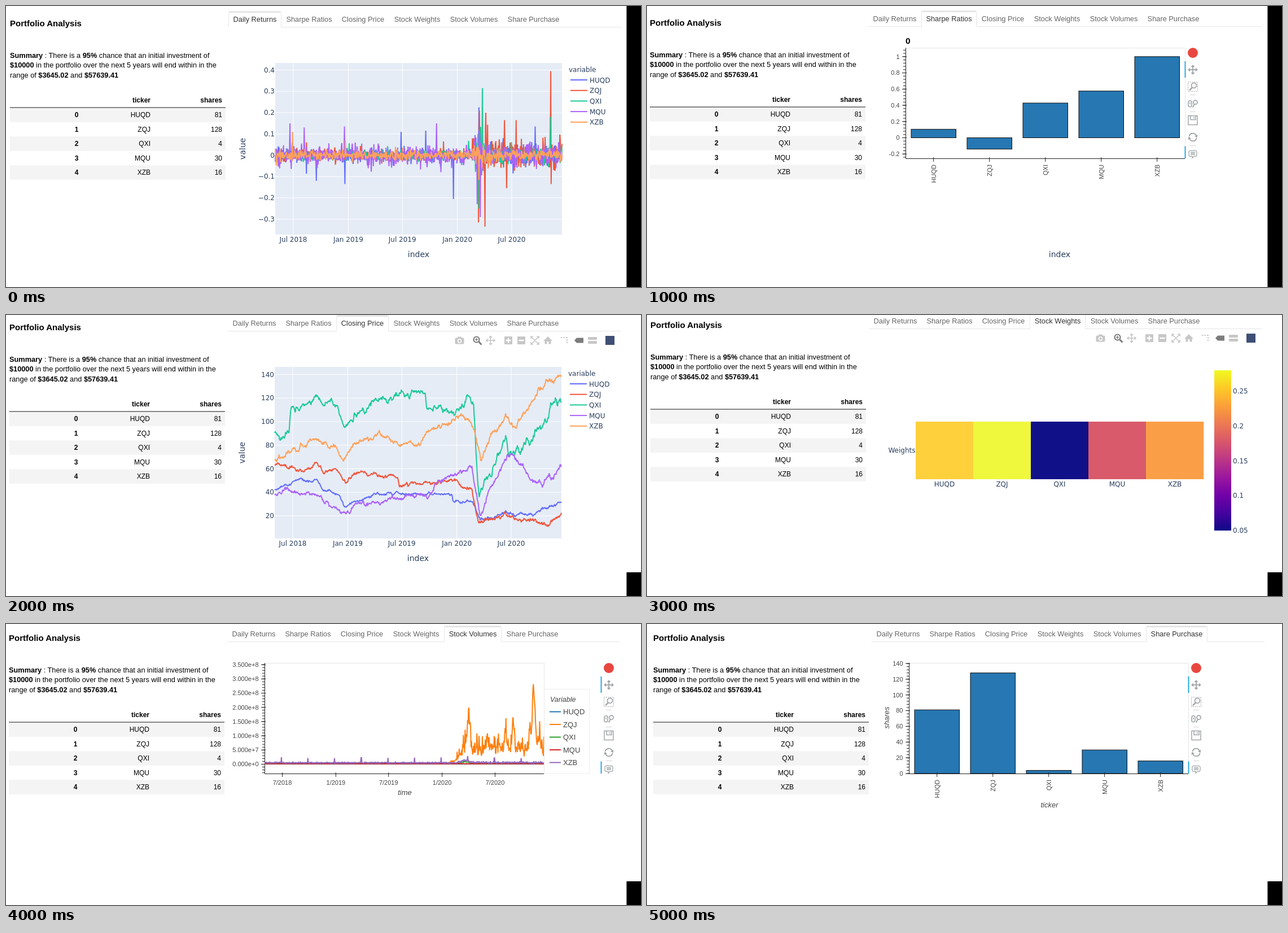
Animation of 1125x498 px, one loop 6 s. Source, as an HTML page:

```html
<!DOCTYPE html>
<html lang="en">
<head>
<meta charset="utf-8">
<title>Portfolio Analysis</title>
<style>
html, body { margin: 0; width: 100%; height: 100%; overflow: hidden; background: #fff; }
svg { display: block; width: 100vw; height: 100vh; font-family: "Liberation Sans", Arial, sans-serif; }
.b { font-weight: bold; }
.i { font-style: italic; fill: #444; font-size: 13px; }
.m { text-anchor: middle; }
.e { text-anchor: end; }
.v { font-family: "DejaVu Sans", Verdana, sans-serif; font-size: 12px; fill: #2a3f5f; }
.t { font-size: 11px; fill: #444; }
.tab { font-size: 12.8px; fill: #666; text-anchor: middle; }
.s { font-size: 12.75px; }
</style>
</head>
<body>
<svg id="stage" viewBox="0 0 1125 498"></svg>
<script>
const names = ['HUQD', 'ZQJ', 'QXI', 'MQU', 'XZB'];
const shares = [81, 128, 4, 30, 16];
const express = ['#636efa', '#ef553b', '#1cca98', '#ab63fa', '#ffa15a'];
const classic = ['#1f77b4', '#ff7f0e', '#2ca02c', '#d62728', '#9467bd'];

// Drawing helpers
const text = (x, y, s, cls = '', more = '') => `<text x="${x}" y="${y}" class="${cls}" ${more}>${s}</text>`;
const turned = (x, y, s, cls, more = '') => text(0, 0, s, cls, `transform="translate(${x} ${y}) rotate(-90)" ${more}`);
const rect = (x, y, w, h, fill, more = '') => `<rect x="${x}" y="${y}" width="${w}" height="${h}" fill="${fill}" ${more}/>`;
const path = (d, stroke, w = 1, more = '') => `<path d="${d}" fill="none" stroke="${stroke}" stroke-width="${w}" ${more}/>`;
const at = (x, y, s) => `<g transform="translate(${x} ${y})">${s}</g>`;
const each = (list, f) => list.map(f).join('');
const span = (n, step = 1, from = 0) => Array.from({ length: n }, (_, i) => from + i * step);

// Seeded noise
let seed = 11;
const rand = () => (seed = (seed * 16807) % 2147483647) / 2147483647;
const gauss = () => (rand() + rand() + rand() + rand() - 2) * 1.73;

// Time series: t runs over 32 months, one sample per trading day
const days = 664, months = 32;
const series = (f, toX, toY, color) => path('M' + span(days).map(k => {
  const t = k / (days - 1) * months;
  return toX(t).toFixed(1) + ' ' + toY(f(t)).toFixed(1);
}).join('L'), color, 2, 'stroke-miterlimit="2"');

const halfYears = span(5).map(i => new Date(Date.UTC(2018, 6 + 6 * i, 1)));
const daysIn = d => (d - halfYears[0]) / 864e5;

// Value at t on key points t0,v0,t1,v1,...
function lerp(k, t) {
  let i = 0;
  while (i < k.length - 4 && t > k[i + 2]) i += 2;
  return k[i + 1] + (k[i + 3] - k[i + 1]) * (t - k[i]) / (k[i + 2] - k[i]);
}

// Left column and tab bar
const tabs = ['Daily Returns', 'Sharpe Ratios', 'Closing Price', 'Stock Weights', 'Stock Volumes', 'Share Purchase'];
const edges = [394, 488, 586, 679, 778, 880, 989];

function page(active) {
  const l = edges[active] + .5, r = edges[active + 1] - .5;
  const b = s => `<tspan class="b">${s}</tspan>`;
  return text(7, 36, 'Portfolio Analysis', 'b', 'font-size="15"') +
    text(7, 91.5, b('Summary') + ' : There is a ' + b('95%') + ' chance that an initial investment of', 's') +
    text(7, 109, b('$10000') + ' in the portfolio over the next 5 years will end within in the', 's') +
    text(7, 126.5, 'range of ' + b('$3645.02') + ' and ' + b('$57639.41'), 's') +
    `<g font-size="12">` + text(256, 171, 'ticker', 'b e') + text(383, 171, 'shares', 'b e') +
    each(names, (n, i) => {
      const y = 197.3 + i * 25.5;
      return (i % 2 ? '' : rect(7, y - 17, 382, 25.5, '#f4f4f4')) +
        text(128.5, y, i, 'b e') + text(256, y, n, 'e') + text(383, y, shares[i], 'e');
    }) + '</g>' + path('M7 180H389', '#111') +
    path(`M394 37.5H${l}V12q0-2 2-2H${r - 2}q2 0 2 2V37.5H1090`, '#e6e6e6') +
    path(`M${l + 1} 10.5H${r - 1}`, '#e6e6e6', 3) +
    each(tabs, (s, i) => text((edges[i] + edges[i + 1]) / 2, 27.5, s, 'tab', i == active ? 'style="fill:#333"' : ''));
}

// Line chart on a tinted panel
const panelX = t => 477 + t * 508 / months;
const indexLabel = text(731, 444.5, 'index', 'v m', 'style="font-size:14px"');

function panel(ticks, toY, lines) {
  return rect(477, 101, 508, 304, '#e5ecf6') +
    each(halfYears, d => {
      const x = 509 + daysIn(d) * .5294;
      return path(`M${x} 101V405`, '#fff') +
        text(x, 417.5, `${d.getUTCMonth() ? 'Jul' : 'Jan'} ${d.getUTCFullYear()}`, 'v m');
    }) +
    each(ticks, v => path(`M477 ${toY(v)}H985`, '#fff', v ? 1 : 2) +
      text(476, toY(v) + 4, String(v).replace('-', '−'), 'v e')) +
    lines.join('') + indexLabel +
    turned(424, 253, 'value', 'v m', 'style="font-size:14px"') + text(997, 116.5, 'variable', 'v') +
    each(names, (n, i) => path(`M1000 ${131 + i * 18.7}h30`, express[i], 2) + text(1034, 135.5 + i * 18.7, n, 'v'));
}

// Daily returns: noise that swells in the crash, plus a few big days
function daily() {
  const toY = v => 264.5 - v * 377.5;
  const returns = (i, calm, after, crash, ...big) => series(t => {
    const day = big.find(b => Math.abs(b[0] - t) < months / days / 2);
    if (day) return day[1];
    const swell = t < 22 ? 1 : after + crash * Math.exp(-((t - 22.8) ** 2) * 3);
    return gauss() * calm * swell * (rand() < .03 ? 2.2 : 1);
  }, panelX, toY, express[i]);
  return panel(span(8).map(i => (4 - i) / 10), toY, [
    returns(0, .014, 1.9, 2, [4.6, -.12], [7.75, -.135], [14.05, .11], [16.8, .115], [19.9, -.205], [22.74, .225], [29, .135]),
    returns(1, .014, 2.5, 3, [22.7, -.315], [23.4, -.335], [23.5, .2], [25.6, .165], [25.8, -.155], [26.9, .165], [30.74, .395], [30.8, -.135]),
    returns(2, .012, 1.7, 4, [22.74, -.25], [23.1, .315], [30.7, .18]),
    returns(3, .023, 1.1, 2, [1.64, .15], [7.7, .135], [18, .15], [22.55, -.23], [22.9, -.29]),
    returns(4, .012, 1.15, 1.5, [1.95, .11], [7.8, .07], [22.74, -.115])
  ]);
}

// Closing prices: a noisy walk around a few turning points
function closing() {
  const toY = v => 365 - (v - 20) * 2.0875;
  const price = (i, rough, ...keys) => {
    let drift = 0;
    return series(t => {
      drift = .85 * drift + gauss() * rough * (t > 22 ? 1.3 : 1);
      return lerp(keys, t) + drift;
    }, panelX, toY, express[i]);
  };
  return panel(span(7).map(i => 140 - 20 * i), toY, [
    price(0, .4, 0, 42, 2.3, 50, 4.7, 50, 5.4, 42, 7.2, 38, 7.8, 28, 11.6, 39, 19.8, 38, 19.9, 32, 22.1, 33, 22.9, 16, 25.6, 22, 29, 21, 32, 31),
    price(1, .6, 0, 64, 3.3, 58, 4.7, 66, 5.5, 57, 7, 60, 7.9, 48, 9.5, 58, 13.7, 52, 13.9, 45, 20, 50, 22, 41, 22.8, 13, 25.7, 20, 30.6, 14, 32, 22),
    price(2, 1.1, 0, 92, .6, 85, 1.6, 91, 1.8, 109, 4.5, 119, 7, 112, 7.8, 97, 11, 117, 16.8, 126, 17, 115, 20.1, 108, 21.7, 121, 22.2, 114, 22.8, 35, 25.8, 86, 26.1, 72, 27.3, 74, 30.4, 98, 30.8, 114, 32, 115),
    price(3, .75, 0, 38, 2, 42, 5, 37, 7.7, 21, 9.4, 30, 17.6, 40, 18, 50, 22, 61, 22.9, 22, 24.1, 45, 26, 70, 27.7, 63, 28.6, 50, 30, 48, 32, 61),
    price(4, .85, 0, 67, 4.7, 86, 7.8, 69, 8.8, 80, 11.8, 89, 14, 81, 15.5, 80, 17.6, 94, 20.9, 104, 22.1, 98, 23, 65, 24, 84, 25.7, 104, 27, 97, 29.8, 129, 32, 138)
  ]);
}

// Icon strips
const cross = 'M-7 0H7M0-7V7M-5-2.5-7.5 0-5 2.5M5-2.5 7.5 0 5 2.5M-2.5-5 0-7.5 2.5-5M-2.5 5 0 7.5 2.5 5';
const ring = (x, y, r, c, w) => `<circle cx="${x}" cy="${y}" r="${r}" fill="none" stroke="${c}" stroke-width="${w}"/>`;

function topStrip() {
  const c = '#c7c7c7', on = '#7c7c7c';
  const box = d => rect(-7, -7, 14, 14, c, 'rx="1"') + path(d, '#fff', 2.4);
  const icons = [
    [804.5, rect(-8, -4.5, 16, 11, c, 'rx="2"') + rect(-3.5, -6.5, 7, 4, c, 'rx="1"') + ring(0, 1, 3, '#fff', 1.6)],
    [836, ring(-1.5, -1.5, 5, on, 2.2) + path('M2.5 2.5 7.5 7.5', on, 3) + path('M-4-1.5H1M-1.5-4V1', on, 1.4)],
    [859.5, path(cross, c, 1.7)],
    [891, box('M-4.5 0H4.5M0-4.5V4.5')],
    [914, box('M-4.5 0H4.5')],
    [938, path('M-7-3V-7H-3M3-7H7V-3M7 3V7H3M-3 7H-7V3M-6-6 6 6M6-6-6 6', c, 1.6)],
    [961, `<path d="M-8 1 0-7 8 1H5.5V6.5H1.5V2H-1.5V6.5H-5.5V1Z" fill="${c}"/>`],
    [991, path('M-7-5h2.5m2 0h2.5m2 0h3M4-2v2.5m0 2V5', c, 2)],
    [1016, `<path d="M-8 0-4-4.5H8V4.5H-4Z" fill="${on}"/>`],
    [1040, rect(-8, -6, 16, 5, c, 'rx="1"') + rect(-8, 1, 16, 5, c, 'rx="1"')],
    [1071, rect(-8, -8, 16, 16, '#3f4f75')]
  ];
  return each(icons, ([x, s]) => at(x, 54, s));
}

function sideStrip(x) {
  const c = '#a1a6a9';
  const icons = [
    '<circle r="9" fill="#e8473f"/>',
    path(cross, c, 1.8),
    path('M-8.5-8H8.5V8.5H-8.5Z', c, 1, 'stroke-dasharray="2 1.5"') + ring(2, -2, 4.5, c, 1.8) + path('M-1 1.5-6 6.5', c, 2.4),
    path('M-8-2a3 3 0 0 1 6 0V3a3 3 0 0 1-6 0ZM-5-2V1', c, 1.6) + ring(4.5, -2, 3.6, c, 1.7) + path('M2.5 1.5 0 7', c, 2),
    path('M-8-8H8V8H-8ZM-4-8V-1H5V-8M2-6V-3', c, 1.5),
    path('M-6.5-1.5A6.5 6.5 0 0 1 6-2.5M6.5 1.5A6.5 6.5 0 0 1-6 2.5', c, 1.8) +
      `<path d="M8.5-4.5 7.5 1 3-2ZM-8.5 4.5-7.5-1-3 2Z" fill="${c}"/>`,
    path('M-4-6H4q3 0 3 3V1q0 3-3 3H2L-1 7V4H-4q-3 0-3-3V-3q0-3 3-3ZM-4-3H4M-4-1H4M-4 1H4', c, 1.3)
  ];
  return each(icons, (s, i) => at(x, 84 + i * 29.9, s)) +
    path(`M${x - 5} 158.5h10m-10 30h10m-10 60h10`, '#d3d3d3') +
    path(`M${x - 13.5} 99V128M${x - 13.5} 249.5V271`, '#26aae1', 2);
}

// White chart frame with ticked axes
function frame(toY, ticks, step, label = String) {
  const first = 271 - (271 - toY(0)) % (step / 5);
  const low = toY(0) + Math.floor((271 - toY(0)) / (step / 5)) * step / 5;
  const minor = each(span(Math.floor((low - 75) / (step / 5)) + 1, -step / 5, low), y => `M456 ${y}h4`);
  return path('M460 75.5H955.5V271', '#e5e5e5') + path('M460.5 75V271.5H955' + minor, '#222') +
    each(ticks, v => path(`M454 ${toY(v)}h8`, '#222') + text(449.5, toY(v) + 3.8, label(v), 't e'));
}
const xTick = x => path(`M${x} 269v8`, '#222');

function bars(vals, toY) {
  return each(vals, (v, i) => {
    const x = 470 + i * 99, top = toY(Math.max(v, 0)), low = toY(Math.min(v, 0));
    return rect(x, top, 79.5, low - top, '#2677b2', 'stroke="#111"') +
      xTick(x + 39.7) + turned(x + 43.5, 282, names[i], 't e');
  });
}

function ratios() {
  const toY = v => 234.5 - v * 143.75;
  return text(460, 67.5, '0', 'b', 'font-size="15.5"') + frame(toY, span(7).map(i => (i - 1) / 5), 28.75) +
    bars([.105, -.14, .428, .576, 1], toY) + sideStrip(969);
}

function purchase() {
  const toY = v => 271 - v * 1.393;
  return frame(toY, span(8, 20), 27.86) + bars(shares, toY) +
    turned(425, 172, 'shares', 'i m') + text(709, 330.5, 'ticker', 'i m') + sideStrip(969);
}

function weights() {
  const fills = ['#fdd03c', '#eff83d', '#101088', '#d95a6a', '#fa9f47'];
  const plasma = '0d0887 46039f 7201a8 9c179e bd3786 d8576b ed7953 fb9f3a fdca26 f0f921'.split(' ');
  return `<linearGradient id="scale" x1="0" y1="1" x2="0" y2="0">` +
    each(plasma, (c, i) => `<stop offset="${i / 9}" stop-color="#${c}"/>`) + '</linearGradient>' +
    each(fills, (c, i) => rect(477 + i * 102, 202, 102.2, 102, c) + text(528 + i * 102, 317, names[i], 'v m')) +
    text(476.5, 257, 'Weights', 'v e') + rect(1006, 111, 30, 284, 'url(#scale)') +
    each(span(5), i => text(1039, 152 + i * 61.8, (5 - i) / 20, 'v')) + topStrip();
}

// Trading volumes in pixels: flat noise, one series that erupts late
function volumes() {
  const toY = v => 254.5 - v * 25.2;
  const peaks = [[23.4, 75], [25.5, 25], [27.6, 45], [28.5, 65], [30.4, 40], [30.77, 115], [30.95, 65], [31.5, 35]];
  const panic = t => Math.exp(-((t - 23) ** 2) * 3);
  const quarterly = t => (t + 1.15) % 3.05 < .06 ? 9 : 0;
  const level = [
    () => .5,
    t => {
      const rise = Math.min(1, Math.max(0, (t - 20.8) / 2.2));
      const spikes = peaks.reduce((sum, [p, h]) => sum + h * Math.exp(-Math.abs(t - p) / .13), 0);
      return 2.5 + (24 + 12 * panic(t)) * rise * rise * Math.exp(gauss() * .35) + spikes;
    },
    t => 1 + rand() + 3 * panic(t),
    () => .6 + rand() * .6,
    t => 1.6 + rand() * (t > 22 ? 3 : 2) + 4 * panic(t) + quarterly(t)
  ];
  return frame(toY, span(8), 25.2, v => (v * 5e7).toExponential(3).replace('+', '+')) +
    each(level, (f, i) => series(f, t => 460 + t * 495 / months, h => 254.5 - h, classic[i])) +
    each(halfYears, d => {
      const x = 491.5 + daysIn(d) * .5157;
      return xTick(x) + text(x, 290.5, `${d.getUTCMonth() + 1}/${d.getUTCFullYear()}`, 't m');
    }) +
    text(708.5, 308.5, 'time', 'i m') +
    rect(955.5, 121.5, 80, 149.5, '#fff', 'stroke="#e5e5e5" stroke-dasharray="2 1"') +
    text(966, 143.5, 'Variable', 'i', 'style="font-size:12.5px"') +
    each(names, (n, i) => path(`M965 ${161.5 + i * 22.5}h20`, classic[i], 2) +
      text(989, 166 + i * 22.5, n, '', 'font-size="13" fill="#444"')) +
    sideStrip(1070);
}

// Each view: scroll offset and chart
const views = [
  [0, 0, daily()],
  [-2, -1, ratios()],
  [-1, -9, closing() + topStrip()],
  [-1, -13, weights()],
  [-2, -6, volumes()],
  [4, -6, purchase()]
];
const stage = document.getElementById('stage');
stage.innerHTML = each(views, ([x, y, chart], i) => {
  const top = i < 2 ? 0 : 456;
  return `<g class="view" display="none">${at(x, y, page(i) + chart)}${i == 1 ? indexLabel : ''}` +
    rect(1099.4, top, 26, 498 - top, '#000') + '</g>';
});

const scenes = stage.querySelectorAll('.view');
function draw() {
  const k = Math.floor(performance.now() % 6000 / 1000);
  scenes.forEach((g, i) => g.setAttribute('display', i == k ? 'inline' : 'none'));
  requestAnimationFrame(draw);
}
draw();
</script>
</body>
</html>
```
